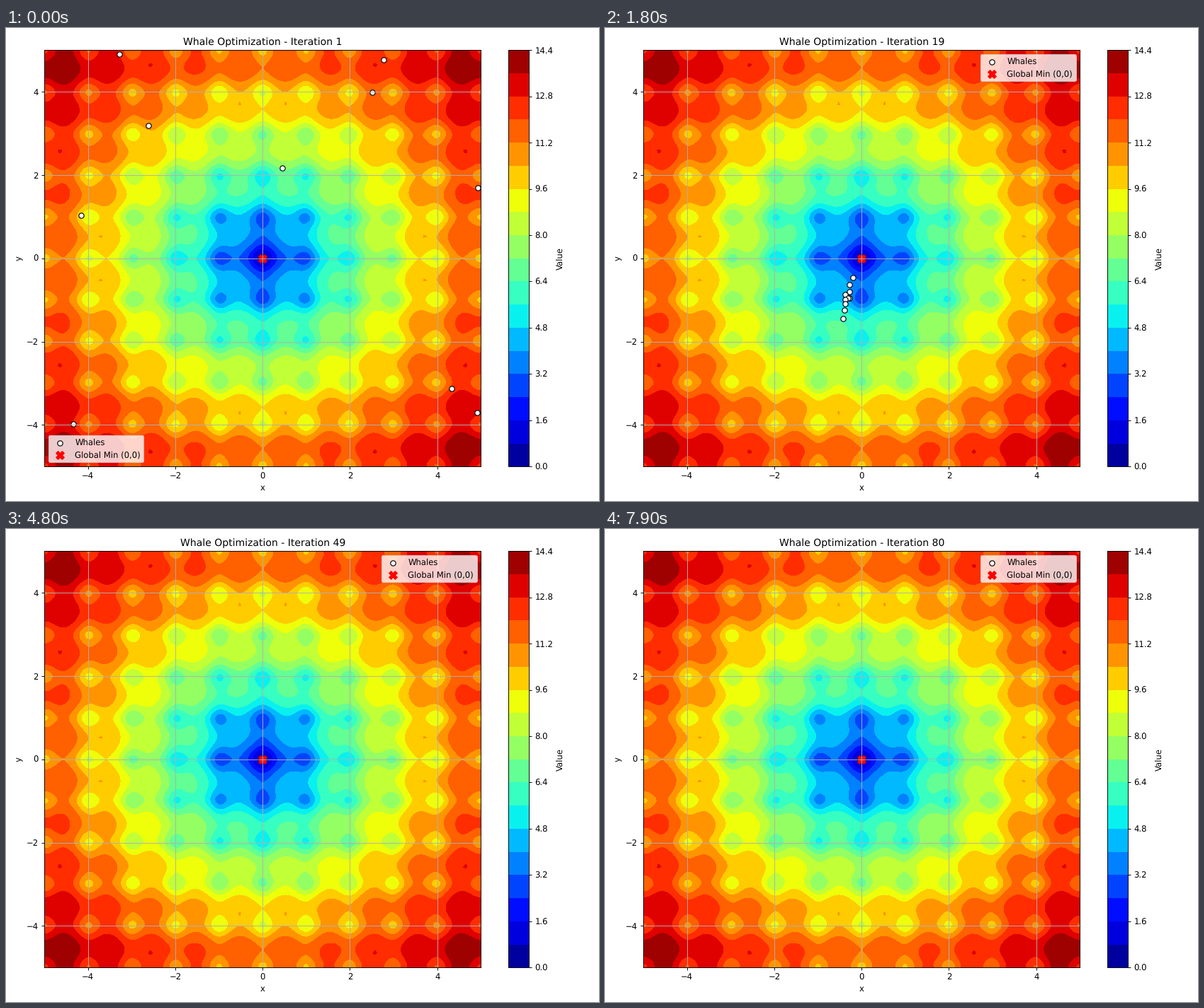
A matplotlib script that plays this animation: 837 by 669 pixels, repeating every 8000 ms.

```python
import numpy as np
import matplotlib.pyplot as plt
from matplotlib.animation import FuncAnimation

DPI = 83.7
FRAMES = 80
LOW, HIGH = -5, 5
START = [(-3.28, 4.90), (2.77, 4.76), (2.51, 3.98), (-2.62, 3.19), (0.45, 2.17),
         (4.93, 1.70), (-4.16, 1.03), (4.33, -3.13), (4.92, -3.71), (-4.34, -3.98)]


def ackley(x, y):
    r = np.sqrt((x**2 + y**2) / 2)
    c = (np.cos(2 * np.pi * x) + np.cos(2 * np.pi * y)) / 2
    return -20 * np.exp(-0.2 * r) - np.exp(c) + np.e + 20


def swarm(i):
    """Whales strung along a line that leaps round the minimum and shrinks."""
    if i == 0:
        return np.array(START)
    rng = np.random.default_rng(i)
    turn = np.radians(37 + 143.6 * (i - 9))
    reach = 1.9 * np.exp(-0.148 * (i - 9))
    drift = np.sin(np.pi * (i - 9) / 18) if 9 < i < 27 else 0
    u = np.linspace(-1, 1, len(START))
    along = drift + reach * u * np.abs(u)
    aside = 0.08 * reach * rng.standard_normal(len(u))
    pos = np.column_stack([along * np.cos(turn) - aside * np.sin(turn),
                           along * np.sin(turn) + aside * np.cos(turn)])
    if i < 28 and i % 3 == 1:  # one whale scouts far away
        pos[0] = rng.uniform(LOW, HIGH, 2)
    return np.clip(pos, LOW, HIGH)


fig, ax = plt.subplots(figsize=(10, 669.01 / DPI), dpi=100)
axis = np.linspace(LOW, HIGH, 200)
X, Y = np.meshgrid(axis, axis)
field = ax.contourf(X, Y, ackley(X, Y), levels=np.arange(19) * 0.8, cmap="jet")
fig.colorbar(field, ax=ax, label="Value", ticks=np.arange(0, 14.5, 1.6))

whales = ax.scatter(*swarm(0).T, s=40, c="white", edgecolors="black", label="Whales")
ax.scatter(0, 0, s=100, c="red", marker="X", label="Global Min (0,0)")
ax.set(xlim=(LOW, HIGH), ylim=(LOW, HIGH), xlabel="x", ylabel="y")
title = ax.set_title("Whale Optimization - Iteration 1")
ax.legend(loc="best")
ax.grid(True)

# Lay out at full resolution, then draw smaller with unhinted text.
fig.tight_layout()
fig.set_dpi(DPI)
plt.rcParams["text.hinting"] = "none"


def update(i):
    whales.set_offsets(swarm(i))
    title.set_text(f"Whale Optimization - Iteration {i + 1}")
    return whales, title


anim = FuncAnimation(fig, update, frames=FRAMES, interval=100,
                     init_func=lambda: update(0), repeat=True, repeat_delay=0)
plt.show()
```
